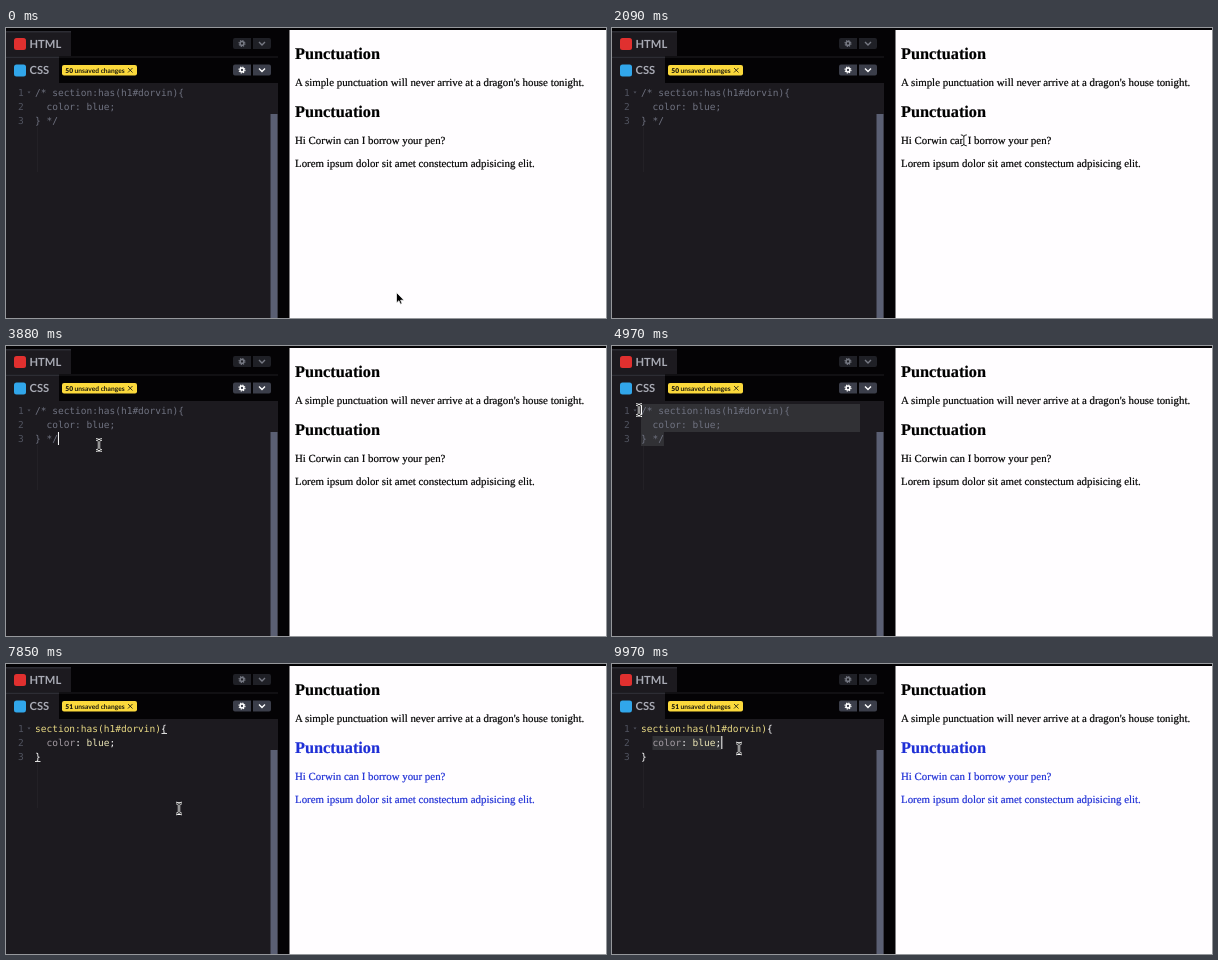
An HTML page that plays this animation: 600 px wide and 290 px high, repeating every 10000 ms.

```html
<!DOCTYPE html>
<html lang="en">
<head>
<meta charset="utf-8">
<style>
  html, body { margin: 0; width: 100%; height: 100%; overflow: hidden; background: #000; }
  svg { display: block; width: 600px; height: 290px; }
  text { white-space: pre; text-rendering: geometricPrecision; }
  .tab { font: bold 11.2px Lato, sans-serif; fill: #a9abb5; }
  .pill { font: bold 6.65px Lato, sans-serif; fill: #1c1a10; }
  .code { font: 9.53px "DejaVu Sans Mono", monospace; fill: #6f7280; }
  .gutter { fill: #50535f; }
  .page { font: 10.88px "Liberation Serif", serif; stroke-width: .2; }
  .page .h { font-weight: bold; font-size: 16.3px; }
  .sel { fill: #e9da84; }
  .prop { fill: #a39ba2; }
  .val { fill: #ebe5b6; }
  .pun { fill: #fff; }
</style>
</head>
<body>
<svg viewBox="0 0 600 290">
  <defs>
    <g id="buttons">
      <path d="M229 0h16v11h-16a2 2 0 0 1-2-2v-7a2 2 0 0 1 2-2zM247 0h16a2 2 0 0 1 2 2v7a2 2 0 0 1-2 2h-16z"/>
      <g fill="none" stroke="currentColor">
        <circle cx="236" cy="5.5" r="1.9" stroke-width="1.5"/>
        <circle cx="236" cy="5.5" r="3" stroke-width="1.1" stroke-dasharray="1.2 1.156"/>
        <path d="M253 4l3 3 3-3" stroke-width="1.4"/>
      </g>
    </g>
    <path id="beamShape" d="M-3-5.500Q0-5.500 0-3.500V3.500Q0 5.500-3 5.500M3-5.500Q0-5.500 0-3.500M0 3.500Q0 5.500 3 5.500"/>
  </defs>

  <rect width="600" height="290" fill="#040305"/>
  <rect y="3" width="65" height="25" fill="#1c1a1f"/>
  <rect y="3" width="65" height="1.500" fill="#2d2d34"/>
  <rect y="28.500" width="272" height="1" fill="#1f1e23"/>
  <rect y="29" width="53" height="27" fill="#1c1a1f"/>
  <rect y="28.500" width="53" height="1.500" fill="#2d2d34"/>
  <rect x="8" y="10" width="12" height="12" rx="2.500" fill="#e0302f"/>
  <rect x="8" y="36.500" width="12" height="12" rx="2.500" fill="#31a6ea"/>
  <text class="tab" x="23.500" y="20">HTML</text>
  <text class="tab" x="23.500" y="46.300">CSS</text>
  <use href="#buttons" y="10" fill="#1f2026" color="#777a84"/>
  <use href="#buttons" y="36.500" fill="#3b3e4a" color="#fff"/>
  <rect x="56" y="37" width="75" height="10.500" rx="2" fill="#fbd93c"/>
  <text class="pill" x="59.300" y="44.700"><tspan id="count" font-weight="900">50</tspan> unsaved changes</text>
  <path d="M122 40l4.500 4.500m0-4.500l-4.500 4.500" stroke="#111" stroke-width=".8"/>

  <rect y="55" width="272" height="235" fill="#1c1a1f"/>
  <rect x="264.500" y="86" width="7" height="204" fill="#5a5f73"/>
  <path d="M31.500 99V144" stroke="#232126"/>
  <g class="code">
    <g class="gutter">
      <text x="12" y="68">1</text><text x="12" y="82">2</text><text x="12" y="96">3</text>
      <path d="M21.500 63.500h3l-1.500 2z"/>
    </g>
    <g id="selection" fill="#313135"></g>
    <g id="lines"></g>
    <path id="match" d="M155.500 69.500h5.500M29 97.500h5.500" stroke="#ddd"/>
    <rect id="caret" width="1" height="13" fill="#fff"/>
  </g>

  <rect x="283.500" y="2" width="316.500" height="288" fill="#fffdff"/>
  <g class="page" stroke="#000">
    <text class="h" x="289" y="30.500">Punctuation</text>
    <text x="289" y="58">A simple punctuation will never arrive at a dragon's house tonight.</text>
    <g id="second">
      <text class="h" x="289" y="89">Punctuation</text>
      <text x="289" y="116">Hi Corwin can I borrow your pen?</text>
      <text x="289" y="139">Lorem ipsum dolor sit amet constectum adpisicing elit.</text>
    </g>
  </g>

  <path id="arrow" d="M-.5-.5V10L1.900 7.700 3.500 11.200 5.100 10.500 3.600 7.200H7Z" fill="#000" stroke="#fff" stroke-width=".7"/>
  <g id="beam" fill="none">
    <use href="#beamShape" stroke="#fff" stroke-width="2.400"/>
    <use href="#beamShape" stroke="#111" stroke-width=".9"/>
  </g>
</svg>
<script>
const LOOP = 10000, CHAR = 5.737, LEFT = 29, TOP = 57, ROW = 14;
const EDIT = 6490, RECOLOR = 6580, REFRESH = 7150;
const $ = id => document.getElementById(id);

// Pointer keyframes: time, x, y
const path = [
  [0, 391, 265], [250, 391, 265], [950, 330, 112], [1300, 301, 77], [1600, 301, 77],
  [2050, 350, 112], [2700, 512, 143], [3130, 512, 143], [3680, 93, 99], [4200, 93, 99],
  [4850, 27, 64], [5250, 27, 64], [5700, 145.5, 85.5], [6750, 145.5, 85.5], [7480, 173, 144.5],
  [8300, 173, 144.5], [9150, 41, 80], [9300, 41, 80], [9800, 127, 84.5], [LOOP, 127, 84.5]
];
// Mouse presses: down, up
const presses = [[3700, 4900], [7300, 7300], [9250, 9800]];
// Text areas of the page: right edge, top, bottom
const textAreas = [[374, 15, 35], [578, 48, 61], [374, 74, 93], [441, 106, 120], [528, 129, 142]];

const selector = "section:has(h1#dorvin)";
const commented = [`/* ${selector}{`, "  color: blue;", "} */"];
const live = [`${selector}{`, "  color: blue;", "}"];
const span = (cls, s) => `<tspan class="${cls}">${s}</tspan>`;
const liveMarkup = [
  span("sel", selector) + span("pun", "{"),
  "  " + span("prop", "color") + span("pun", ":") + " " + span("val", "blue") + span("pun", ";"),
  span("pun", "}")
];

function pointer(t) {
  const i = path.findIndex(k => k[0] > t);
  const [t0, x0, y0] = path[i - 1], [t1, x1, y1] = path[i];
  const u = (t - t0) / (t1 - t0), e = u * u * (3 - 2 * u);
  return [x0 + (x1 - x0) * e, y0 + (y1 - y0) * e];
}

const clamp = (v, max) => Math.max(0, Math.min(max, v));

function textPosition(t, lines) {
  const [x, y] = pointer(t);
  const row = clamp(Math.floor((y - TOP) / ROW), 2);
  return [row, clamp(Math.round((x - LEFT) / CHAR), lines[row].length)];
}

function selectionRects(a, b) {
  const [from, to] = a[0] * 100 + a[1] < b[0] * 100 + b[1] ? [a, b] : [b, a];
  let out = "";
  for (let r = from[0]; r <= to[0]; r++) {
    const x0 = LEFT + (r === from[0] ? from[1] * CHAR : 0);
    const x1 = r === to[0] ? LEFT + to[1] * CHAR : 248;
    out += `<rect x="${x0}" y="${TOP + 1 + r * ROW}" width="${x1 - x0}" height="${ROW}"/>`;
  }
  return out;
}

const show = (id, on) => $(id).style.display = on ? "" : "none";

function draw(t) {
  const lines = t < EDIT ? commented : live;
  $("lines").innerHTML = lines.map((s, r) => {
    const colored = t >= (r ? RECOLOR : EDIT);
    return `<text x="${LEFT}" y="${68 + r * ROW}">${colored ? liveMarkup[r] : s}</text>`;
  }).join("");
  $("count").textContent = t < RECOLOR ? "50" : "51";
  const ink = t < REFRESH ? "#000" : "#1f2fd6";
  $("second").setAttribute("fill", ink);
  $("second").setAttribute("stroke", ink);

  const press = presses.filter(p => p[0] <= t).pop();
  $("selection").innerHTML = "";
  show("match", press === presses[1]);
  show("caret", false);
  if (press) {
    const anchor = textPosition(press[0], lines);
    const head = textPosition(Math.min(t, press[1]), lines);
    $("selection").innerHTML = selectionRects(anchor, head);
    const age = t - Math.max(press[1], t >= EDIT ? EDIT : 0);
    show("caret", age < 0 || age % 1060 < 530);
    $("caret").setAttribute("x", LEFT + head[1] * CHAR);
    $("caret").setAttribute("y", TOP + 1 + head[0] * ROW);
  }

  const [x, y] = pointer(t);
  const overText = x < 264 && y > 55 ||
    textAreas.some(([right, top, bottom]) => x > 288 && x < right && y > top && y < bottom);
  show("beam", overText);
  show("arrow", !overText);
  $(overText ? "beam" : "arrow").setAttribute("transform", `translate(${x} ${y})`);
}

function frame() {
  draw(performance.now() % LOOP);
  requestAnimationFrame(frame);
}
frame();
</script>
</body>
</html>
```
